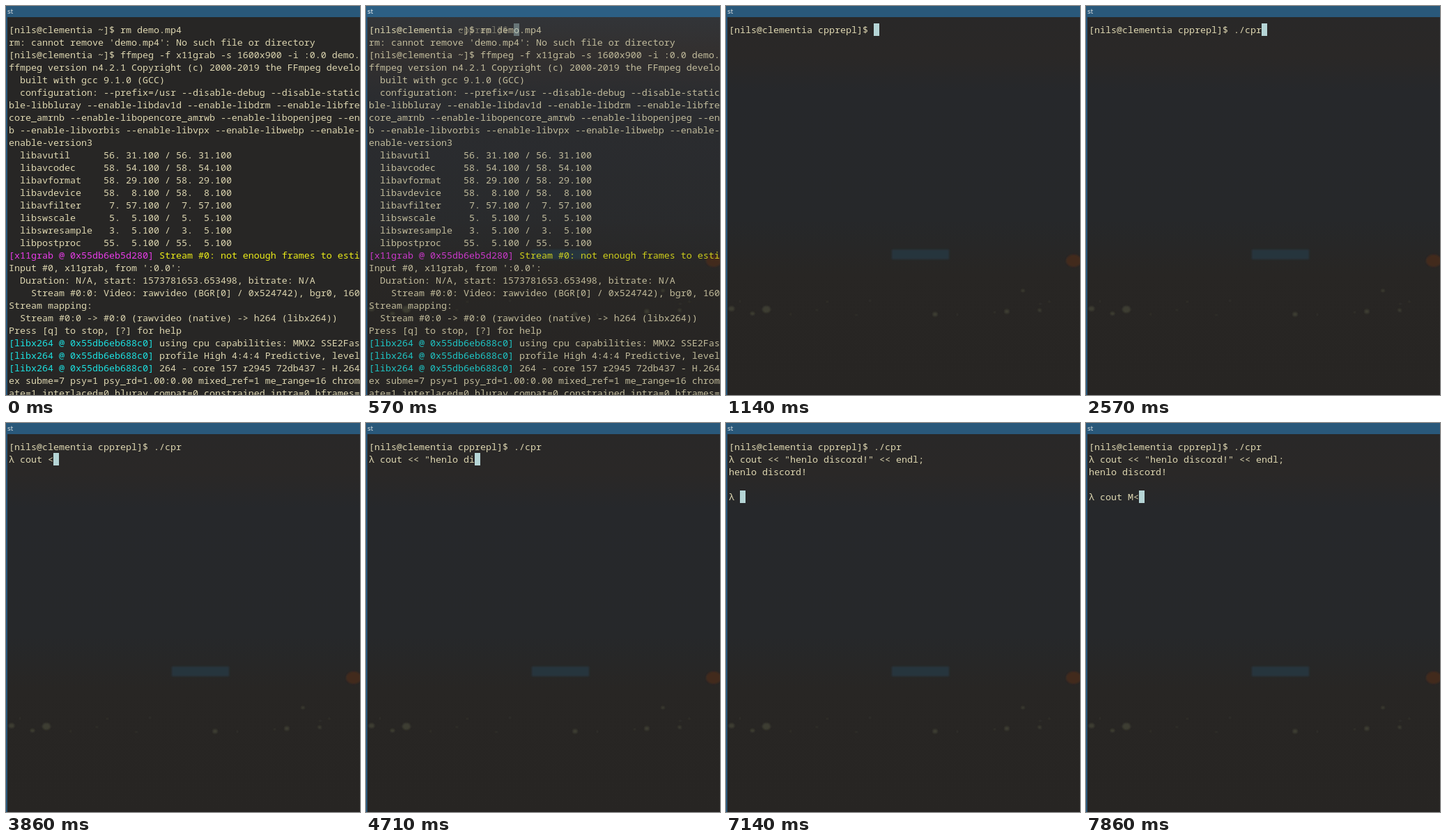
Recreate the animation shown at these times as an HTML page. Size 508 by 559 pixels, loop 8 s.

```html
<!DOCTYPE html>
<html lang="en">
<head>
<meta charset="utf-8">
<title>Terminal session</title>
<style>
  html, body { margin: 0; width: 100%; height: 100%; overflow: hidden; background: #272625; }
  #stage { position: relative; width: 508px; height: 559px; overflow: hidden; background: #272625; }
  #stage > * { position: absolute; }
  svg { left: 0; top: 0; }
  pre {
    margin: 0; left: 4px; top: 25px; white-space: pre; color: #ddd6b0;
    font: 13.3333px/18px "Noto Sans Mono", "DejaVu Sans Mono", monospace;
  }
  .m { color: #e83ce8; }
  .y { color: #ecec18; }
  .c { color: #1ce2e2; }
  #cursor { width: 8px; height: 18px; background: #b5d5d6; }
  #bar {
    left: 0; top: 0; width: 508px; height: 16px; background: #29587a;
    color: #dde2e2; font: 9px/17px "DejaVu Sans", sans-serif; text-indent: 2px;
  }
  #edge { left: 0; top: 16px; width: 2px; height: 543px; background: #28567a; }
</style>
</head>
<body>
<div id="stage">
  <svg width="508" height="559" viewBox="0 0 508 559">
    <defs>
      <linearGradient id="dim" x2="0" y2="1">
        <stop offset=".03" stop-color="#292828"/>
        <stop offset=".13" stop-color="#2a2827"/>
        <stop offset=".22" stop-color="#26282b"/>
        <stop offset=".55" stop-color="#26282a"/>
        <stop offset=".69" stop-color="#282624"/>
        <stop offset="1" stop-color="#272523"/>
      </linearGradient>
      <linearGradient id="lit" x2="0" y2="1">
        <stop offset=".03" stop-color="#3a3f46"/>
        <stop offset=".12" stop-color="#3b3736"/>
        <stop offset=".24" stop-color="#2f3034"/>
        <stop offset=".55" stop-color="#2c2d2f"/>
        <stop offset=".69" stop-color="#292725"/>
        <stop offset="1" stop-color="#262524"/>
      </linearGradient>
      <filter id="soft" x="-50%" y="-50%" width="200%" height="200%"><feGaussianBlur stdDeviation="1"/></filter>
    </defs>
    <g id="scene">
      <rect width="508" height="559" fill="url(#dim)"/>
      <rect id="glow" width="508" height="559" fill="url(#lit)"/>
      <rect x="238" y="350" width="82" height="14" fill="#25353c" filter="url(#soft)"/>
      <g id="lights" filter="url(#soft)"><ellipse cx="499" cy="366" rx="11" ry="9" fill="#432a1f"/></g>
    </g>
  </svg>
  <pre id="old"></pre>
  <pre id="now"></pre>
  <div id="cursor"></div>
  <div id="bar">st</div>
  <div id="edge"></div>
</div>
<script>
const FPS = 7, FRAMES = 56;
const $ = id => document.getElementById(id);
const user = "[nils@clementia ";

function light(x, y, r) {
  const dot = document.createElementNS("http://www.w3.org/2000/svg", "ellipse");
  const set = { cx: x, cy: y, rx: r, ry: r * .85, fill: "#3d3d33" };
  for (const key in set) dot.setAttribute(key, set[key]);
  $("lights").append(dot);
}
let seed = 5;
const rand = () => (seed = seed * 16807 % 2147483647) / 2147483647;

// Main city lights, then scattered faint ones
[[8, 435, 4], [58, 436, 6], [38, 442, 3], [300, 443, 3.5], [403, 439, 3.5], [426, 409, 2.5], [450, 437, 2.5]]
  .forEach(spot => light(...spot));
for (let i = 0; i < 12; i++) light(20 + 470 * rand(), 444 - 45 * rand() ** 2, 1.2);

const libs = [
  "avutil 56 31", "avcodec 58 54", "avformat 58 29", "avdevice 58 8",
  "avfilter 7 57", "swscale 5 5", "swresample 3 5", "postproc 55 5"
].map(lib => {
  const [name, major, minor] = lib.split(" ");
  const ver = `${major.padStart(2)}.${minor.padStart(3)}.100`;
  return `  ${("lib" + name).padEnd(15)}${ver} / ${ver}`;
});
const x264 = text => `<span class="c">[libx264 @ 0x55db6eb688c0]</span> ${text}`;

$("old").innerHTML = [
  user + "~]$ rm demo.mp4",
  "rm: cannot remove 'demo.mp4': No such file or directory",
  user + "~]$ ffmpeg -f x11grab -s 1600x900 -i :0.0 demo.mp4",
  "ffmpeg version n4.2.1 Copyright (c) 2000-2019 the FFmpeg developers",
  "  built with gcc 9.1.0 (GCC)",
  "  configuration: --prefix=/usr --disable-debug --disable-static",
  "ble-libbluray --enable-libdav1d --enable-libdrm --enable-libfre",
  "core_amrnb --enable-libopencore_amrwb --enable-libopenjpeg --en",
  "b --enable-libvorbis --enable-libvpx --enable-libwebp --enable-",
  "enable-version3",
  ...libs,
  '<span class="m">[x11grab @ 0x55db6eb5d280]</span> <span class="y">Stream #0: not enough frames to esti</span>',
  "Input #0, x11grab, from ':0.0':",
  "  Duration: N/A, start: 1573781653.653498, bitrate: N/A",
  "    Stream #0:0: Video: rawvideo (BGR[0] / 0x524742), bgr0, 160",
  "Stream mapping:",
  "  Stream #0:0 -&gt; #0:0 (rawvideo (native) -&gt; h264 (libx264))",
  "Press [q] to stop, [?] for help",
  x264("using cpu capabilities: MMX2 SSE2Fas"),
  x264("profile High 4:4:4 Predictive, level"),
  x264("264 - core 157 r2945 72db437 - H.264"),
  "ex subme=7 psy=1 psy_rd=1.00:0.00 mixed_ref=1 me_range=16 chrom",
  "ate=1 interlaced=0 bluray_compat=0 constrained_intra=0 bframes="
].join("\n");

const clamp = v => Math.min(1, Math.max(0, v));

// Types characters a to b at a steady pace from frame f0 to f1
function typed(text, f, f0, f1, a, b) {
  return f < f0 ? "" : text.slice(0, Math.floor(a + (b - a) * clamp((f - f0) / (f1 - f0))));
}

function screen(f) {
  const lines = [user + "cpprepl]$ " + typed("./cpr", f, 14, 18, 1, 5)];
  const code = 'cout << "henlo discord!" << endl;';
  const first = f < 33 ? typed(code, f, 24, 33, 1, 17) : typed(code, f, 33, 45, 17, 33);
  if (f >= 19) lines.push(f < 20 ? "" : "λ " + first);
  if (f === 46) lines.push("");
  if (f > 46) lines.push("henlo discord!", "", "λ " + typed("cout M<", f, 51, 55, 1, 7));
  return lines;
}

function draw(f) {
  const fade = clamp((f - 3.65) / 2.2);
  const glow = 4 * fade * (1 - fade);
  const lines = screen(f);
  const row = lines.length - 1;
  $("now").textContent = lines.join("\n");
  $("scene").style.opacity = clamp(f / 4);
  $("glow").style.opacity = glow;
  $("bar").style.filter = `brightness(${1 + .15 * glow})`;
  $("old").style.opacity = 1 - fade;
  $("now").style.opacity = $("cursor").style.opacity = Math.sqrt(fade);
  $("cursor").style.left = 4 + 8 * lines[row].length + "px";
  $("cursor").style.top = 25 + 18 * row + "px";
}

const start = performance.now();
let shown = -1;
function tick() {
  // The small lead absorbs frame times rounded to 10 ms
  const f = Math.floor((performance.now() - start + 5) * FPS / 1000) % FRAMES;
  if (f !== shown) draw(shown = f);
  requestAnimationFrame(tick);
}
tick();
</script>
</body>
</html>
```
